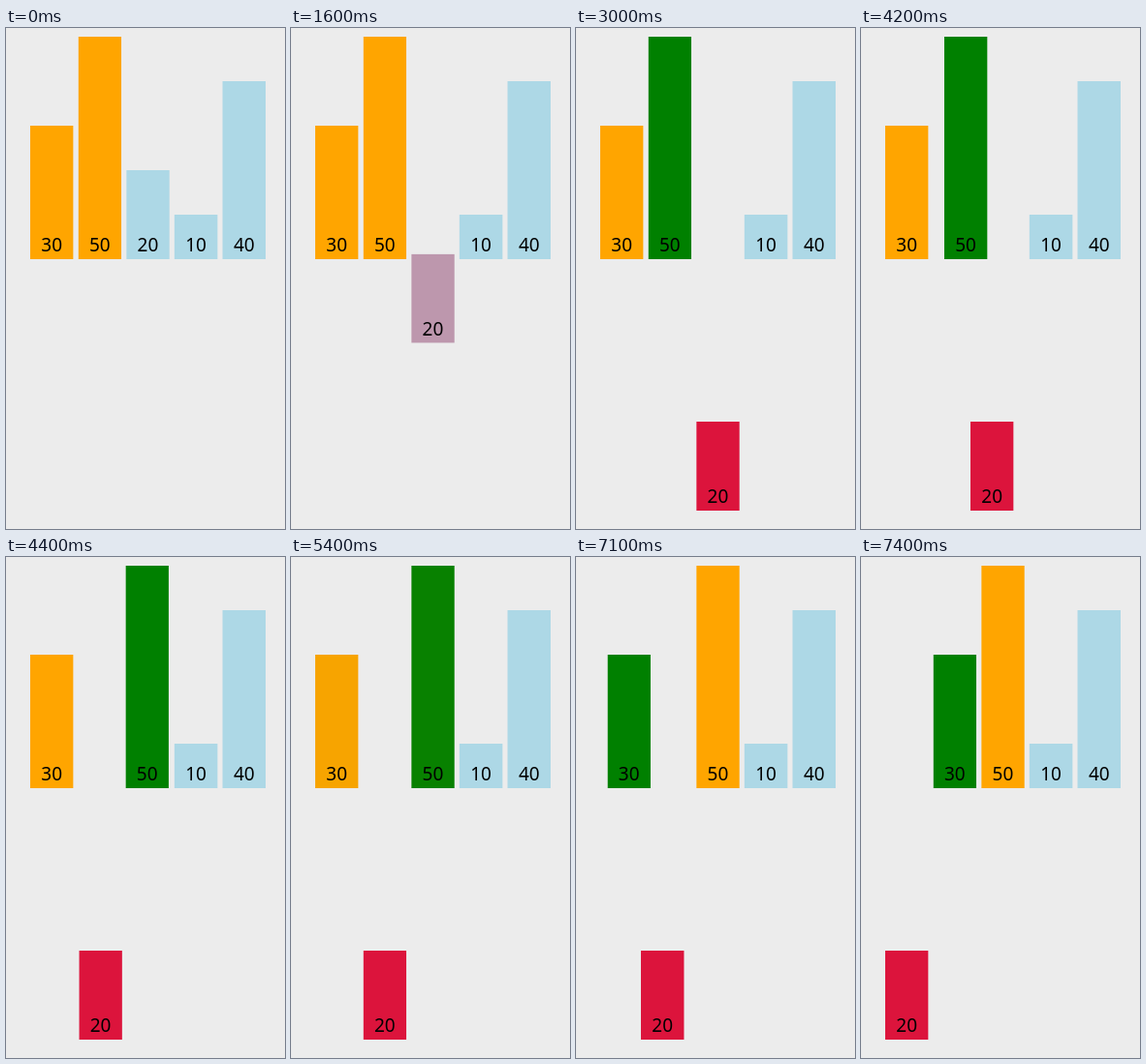
Write an HTML page that moves like this. It is 288 px wide and 518 px high and loops after 8 s.

```html
<!DOCTYPE html>
<html lang="en">
<head>
<meta charset="utf-8">
<title>Insertion sort</title>
<style>
  html, body { margin: 0; width: 100%; height: 100%; overflow: hidden; background: #ececec; }
  svg { display: block; }
  text { font: 19px "Noto Sans", "Open Sans", sans-serif; text-anchor: middle; fill: #000; }
</style>
</head>
<body>
<svg id="stage" width="288" height="518" viewBox="0 0 288 518"></svg>
<script>
const LOOP = 8000, TICK = 100, EASE_MS = 300;
const BASE = 239, UNIT = 4.6, WIDTH = 44.5, DROP = 260;
const slotX = slot => 24.9 + 49.65 * slot;

const bars = [[30, 'orange'], [50, 'orange'], [20, 'lightblue'], [10, 'lightblue'], [40, 'lightblue']];

// start time, bar value, and what changes: slot, drop and fill, each [from, to]
const steps = [
  [1535, 20, { slot: [2, 2], drop: [0, DROP], fill: ['lightblue', 'crimson'] }],
  [2690, 50, { fill: ['orange', 'green'] }],
  [4149, 50, { slot: [1, 2], drop: [0, 0] }],
  [4149, 20, { slot: [2, 1], drop: [DROP, DROP] }],
  [5385, 50, { fill: ['green', 'orange'] }],
  [5385, 30, { fill: ['orange', 'green'] }],
  [7060, 30, { slot: [0, 1], drop: [0, 0] }],
  [7060, 20, { slot: [1, 0], drop: [DROP, DROP] }],
];

const stage = document.getElementById('stage');
const animations = [];
const place = (slot, drop) => `translate(${slotX(slot)}px, ${BASE + drop}px)`;

function add(parent, tag, attrs) {
  const node = document.createElementNS('http://www.w3.org/2000/svg', tag);
  for (const key in attrs) node.setAttribute(key, attrs[key]);
  return parent.appendChild(node);
}

function ease(node, start, frames) {
  const animation = node.animate(frames, {
    delay: start, duration: EASE_MS, easing: 'ease', fill: 'forwards',
  });
  animation.pause();
  animations.push(animation);
}

const parts = {};
bars.forEach(([value, fill], slot) => {
  const group = add(stage, 'g', {});
  group.style.transform = place(slot, 0);
  const height = value * UNIT;
  const rect = add(group, 'rect', { y: -height, width: WIDTH, height });
  rect.style.fill = fill;
  add(group, 'text', { x: WIDTH / 2, y: -8 }).textContent = value;
  parts[value] = { group, rect };
});

for (const [start, value, { slot, drop, fill }] of steps) {
  const { group, rect } = parts[value];
  if (slot) ease(group, start, { transform: [place(slot[0], drop[0]), place(slot[1], drop[1])] });
  if (fill) ease(rect, start, { fill });
}

const origin = performance.now();
function draw() {
  const time = (performance.now() - origin) % LOOP;
  const held = Math.floor(time / TICK) * TICK;
  for (const animation of animations) animation.currentTime = held;
  requestAnimationFrame(draw);
}
draw();
</script>
</body>
</html>
```
